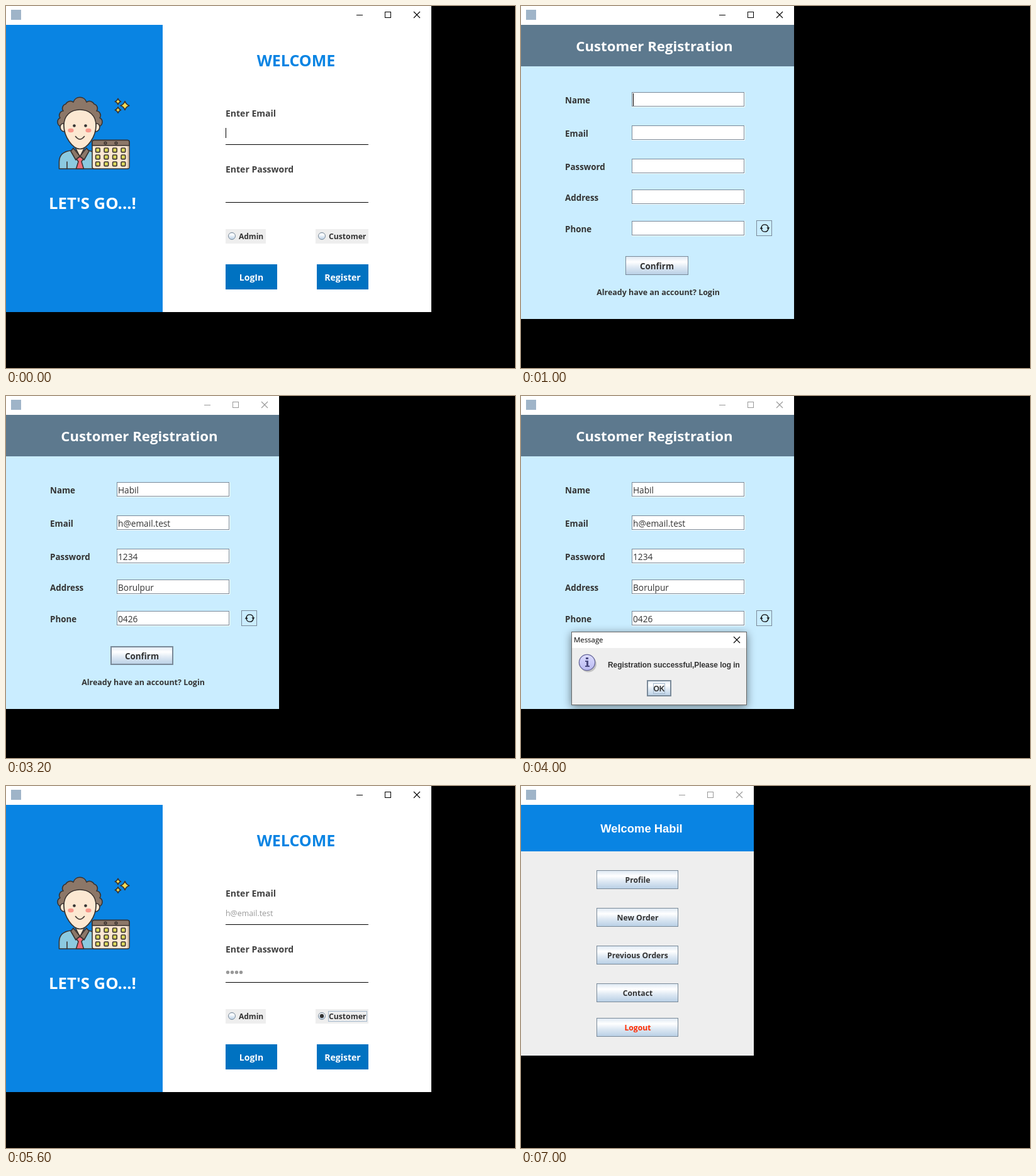
Animation of 809 by 576 pixels, one loop 8 s. Source, as an HTML page:

```html
<!DOCTYPE html>
<html lang="en">
<head>
<meta charset="utf-8">
<title>Customer registration and login</title>
<style>
  html, body { margin: 0; width: 100%; height: 100%; overflow: hidden; background: #000; }
  svg { display: block; }
  text { font-family: "Open Sans", "Noto Sans", sans-serif; font-weight: 700; white-space: pre; }
  .plain { font-weight: 400; }
  .arial { font-family: "Liberation Sans", Arial, sans-serif; }
  .mid { text-anchor: middle; }
  .dialog { filter: drop-shadow(0 3px 7px rgba(0, 0, 0, .5)); }
  .ink { stroke: #3a3330; stroke-width: 1.6; stroke-linejoin: round; stroke-linecap: round; }
</style>
</head>
<body>
<svg width="809" height="576" viewBox="0 0 809 576">
  <defs>
    <linearGradient id="metal" x2="0" y2="1">
      <stop offset="0" stop-color="#dde8f3"/>
      <stop offset=".3" stop-color="#fff"/>
      <stop offset=".6" stop-color="#dde8f3"/>
      <stop offset="1" stop-color="#b8cfe5"/>
    </linearGradient>
    <linearGradient id="info" x2="0" y2="1">
      <stop offset="0" stop-color="#dcdcff"/>
      <stop offset="1" stop-color="#b9b9f0"/>
    </linearGradient>
  </defs>
  <g id="stage"></g>
</svg>
<script>
const BLUE = '#0984e3', EDGE = '#7a8a99', DARK = '#333', BROWN = '#8c7768', CREAM = '#fce8d2';

const rect = (x, y, w, h, fill, extra = '') =>
  `<rect x="${x}" y="${y}" width="${w}" height="${h}" fill="${fill}" ${extra}/>`;
const frame = (x, y, w, h, color, fill = 'none') =>
  rect(x + .5, y + .5, w - 1, h - 1, fill, `stroke="${color}"`);
const text = (x, y, size, str, fill = DARK, cls = '') =>
  `<text x="${x}" y="${y}" font-size="${size}" fill="${fill}" class="${cls}">${str}</text>`;
const path = (d, fill = 'none', extra = 'class="ink"') => `<path d="${d}" fill="${fill}" ${extra}/>`;
const dot = (x, y, r, fill, extra = '') =>
  `<circle cx="${x}" cy="${y}" r="${r}" fill="${fill}" ${extra}/>`;
const cross = (x, y, color) =>
  path(`M${x} ${y}l10 10m0 -10l-10 10`, 'none', `stroke="${color}" stroke-width="1.1"`);

function titleBar(w, active) {
  const c = active ? '#000' : '#999';
  return rect(0, 0, w, 30, '#fff') + rect(8, 6, 16, 16, '#9fb4c8') +
    rect(w - 119, 14, 10, 1, c) + frame(w - 74, 9, 10, 10, c) + cross(w - 28, 9, c);
}

function button(x, y, w, h, thick) {
  return frame(x, y, w, h, EDGE, 'url(#metal)') +
    (thick ? frame(x + 1, y + 1, w - 2, h - 2, EDGE) : '');
}

function star(x, y, r) {
  const k = r * .25;
  return path(`M${x} ${y - r}Q${x + k} ${y - k} ${x + r} ${y}Q${x + k} ${y + k} ${x} ${y + r}` +
    `Q${x - k} ${y + k} ${x - r} ${y}Q${x - k} ${y - k} ${x} ${y - r}z`, '#f4dc55');
}

function worker() {
  const arc = (r, x, y) => `A${r} ${r} 0 0 1 ${x} ${y}`;
  const hair = 'M88 192' + arc(7.5, 86, 178) + arc(7, 91, 167) + arc(7, 95, 156) + arc(8, 107, 153) +
    arc(11, 128, 153) + arc(8, 140, 156) + arc(7, 144, 167) + arc(7, 149, 178) + arc(7.5, 147, 192) + 'z';
  let s = path(hair, BROWN) +
    path('M92 187c-8 -1 -8 12 1 13zM143 187c8 -1 8 12 -1 13z', CREAM) +
    path('M84.5 259V248C84.5 237 92 231 104 230H132L150 236V259z', '#8ccae0') +
    path('M97 248V259') +
    path('M109 223L117.5 240L126 223z', CREAM) +
    path('M107 226L103 231L111 245L117.5 239zM128 226L132 231L124 245L117.5 239z', BROWN) +
    path('M117.5 239.5l5.5 4 -3 4 3.5 11.5h-12l3.5 -11.5 -3 -4z', '#ee6d78') +
    path('M92 190C92 174 103 165 117.5 165S143 174 143 190C143 208 129 227.5 117.5 227.5S92 208 92 190z', CREAM) +
    dot(108.5, 190.5, 2.3, DARK) + dot(126.5, 190.5, 2.3, DARK);
  for (const x of [103, 131])
    s += `<ellipse cx="${x}" cy="198" rx="4.6" ry="3.3" fill="#f8978b"/>`;
  s += path('M110.5 207.5q7 9 14 0') +
    rect(137, 213.5, 59, 45.5, CREAM, 'rx="3" class="ink"') +
    rect(192.5, 223, 2.8, 35, '#d9c3ac') +
    path('M137 222V216.5q0 -3 3 -3H193q3 0 3 3V222z', BROWN) +
    dot(158, 218, 1.8, BROWN, 'class="ink"') + dot(175, 218, 1.8, BROWN, 'class="ink"');
  for (let i = 0; i < 12; i++)
    s += rect(142.6 + i % 4 * 13.5, 226 + (i >> 2) * 11, 6.6, 6.6, '#dcd85c', 'rx="1.2" class="ink"');
  return s + star(189, 158.5, 7) + star(178, 152, 4.7) + star(178, 165.5, 4.7);
}

function radio(x, w, label, size, on) {
  return rect(x, 355, w, 23, '#eee') +
    dot(x + 10, 366, 5.5, 'url(#metal)', `stroke="${EDGE}"`) +
    (on ? dot(x + 10, 366, 3.2, DARK) + frame(x + 20, 358, 62, 17, '#a3b8cc') : '') +
    text(x + 21, 371, size, label);
}

function login(filled, active) {
  let s = titleBar(676, active) + rect(0, 30, 676, 457, '#fff') + rect(0, 30, 249, 457, BLUE) + worker() +
    text(137.5, 323, 25.7, "LET'S GO...!", '#fff', 'mid') +
    text(461, 96, 25, 'WELCOME', BLUE, 'mid') +
    text(349, 176, 14, 'Enter Email', '#404040') + rect(349, 220, 227, 1, '#000') +
    text(349, 265, 14, 'Enter Password', '#404040') + rect(349, 312, 227, 1, '#000') +
    radio(349, 64, 'Admin', 12, false) + radio(492, 84, 'Customer', 12.2, filled);
  for (const [x, label] of [[349, 'LogIn'], [494, 'Register']])
    s += rect(x, 411, 82, 40, '#0072c1') + text(x + 41, 437, 14, label, '#fff', 'mid');
  if (!filled) return s + rect(349, 194, 1, 16, '#000');
  s += text(349, 207, 12.4, 'h@email.test', '#999', 'plain');
  for (let i = 0; i < 4; i++) s += dot(352.5 + i * 7, 296.5, 2.7, '#999');
  return s;
}

const fields = [
  ['Name', 137, 'Habil'], ['Email', 190, 'h@email.test'], ['Password', 243, '1234'],
  ['Address', 292, 'Borulpur'], ['Phone', 342, '0426']
];

function register(filled) {
  let s = titleBar(434, !filled) + rect(0, 30, 434, 66, '#5d798e') + rect(0, 96, 434, 402, '#caedff') +
    text(212, 72, 22.2, 'Customer Registration', '#fff', 'mid');
  for (const [label, y, value] of fields) {
    s += text(70, y + 18, 13.4, label) + rect(176, y, 180, 24, '#fff') + frame(176, y, 179, 23, EDGE);
    if (filled) s += text(178, y + 18, 13.7, value, DARK, 'plain');
  }
  if (!filled) s += rect(178, 139, 1, 20, '#000');
  return s + frame(374, 341, 25, 25, EDGE) +
    path('M382 352A5.6 5.6 0 0 1 393 353M393 355A5.6 5.6 0 0 1 382 354', 'none', 'stroke="#111" stroke-width="1.3"') +
    path('M390.4 352.5h5l-2.5 3.2zM379.6 354.5h5l-2.5 -3.2z', '#111', '') +
    button(166, 398, 100, 30, filled) + text(216, 419, 13.4, 'Confirm', DARK, 'mid') +
    text(218, 460, 12.45, 'Already have an account? Login', DARK, 'mid');
}

function dialog(x, y, w, tx, size, message) {
  const bx = Math.floor((w - 39) / 2);
  return `<g transform="translate(${x} ${y})"><g class="dialog">` + rect(0, 0, w, 117, '#eee') + '</g>' +
    rect(0, 0, w, 26, '#fff') + frame(0, 0, w, 117, '#666') +
    text(4, 17, 11.4, 'Message', '#000', 'plain') + cross(w - 21, 8, '#000') +
    dot(27, 51.5, 13, '#000', 'opacity=".18"') +
    dot(25, 49, 12.6, 'url(#info)', 'stroke="#666699" stroke-width="1.3"') +
    rect(23, 41, 4, 3, '#4b4b80') + path('M22 46h5v8h2v2h-7v-2h2v-6h-2z', '#4b4b80', '') +
    text(tx, 57, size, message, DARK, 'arial') +
    button(bx, 77, 39, 26, true) + frame(bx + 10, 82, 19, 17, '#a3b8cc') +
    text(bx + 19.5, 95, 12, 'OK', DARK, 'arial mid') + '</g>';
}

function menu() {
  const items = [['Profile', 134], ['New Order', 194], ['Previous Orders', 254], ['Contact', 314], ['Logout', 369]];
  let s = titleBar(370, false) + rect(0, 30, 370, 74, BLUE) + rect(0, 104, 370, 325, '#eee') +
    text(191.5, 74, 18.4, 'Welcome Habil', '#fff', 'arial mid');
  for (const [label, y] of items)
    s += button(120, y, 130, 30) + text(185.5, y + 20, 12.2, label, label === 'Logout' ? '#ff2a00' : DARK, 'mid');
  return s;
}

const scenes = [
  [0, () => login(false, true)],
  [1000, () => register(false)],
  [2000, () => register(true)],
  [4000, () => register(true) + dialog(80, 375, 279, 58, 11.88, 'Registration successful,Please log in')],
  [5000, () => login(true, true)],
  [6000, () => login(true, false) + dialog(335, 351, 264, 59, 11.65, 'Successfully Login')],
  [7000, menu]
];

const stage = document.getElementById('stage');
const start = performance.now();
let shown;

function tick() {
  const time = (performance.now() - start) % 8000;
  const scene = scenes.findLast(([from]) => from <= time);
  if (scene !== shown) {
    shown = scene;
    stage.innerHTML = scene[1]();
  }
  requestAnimationFrame(tick);
}
tick();
</script>
</body>
</html>
```
